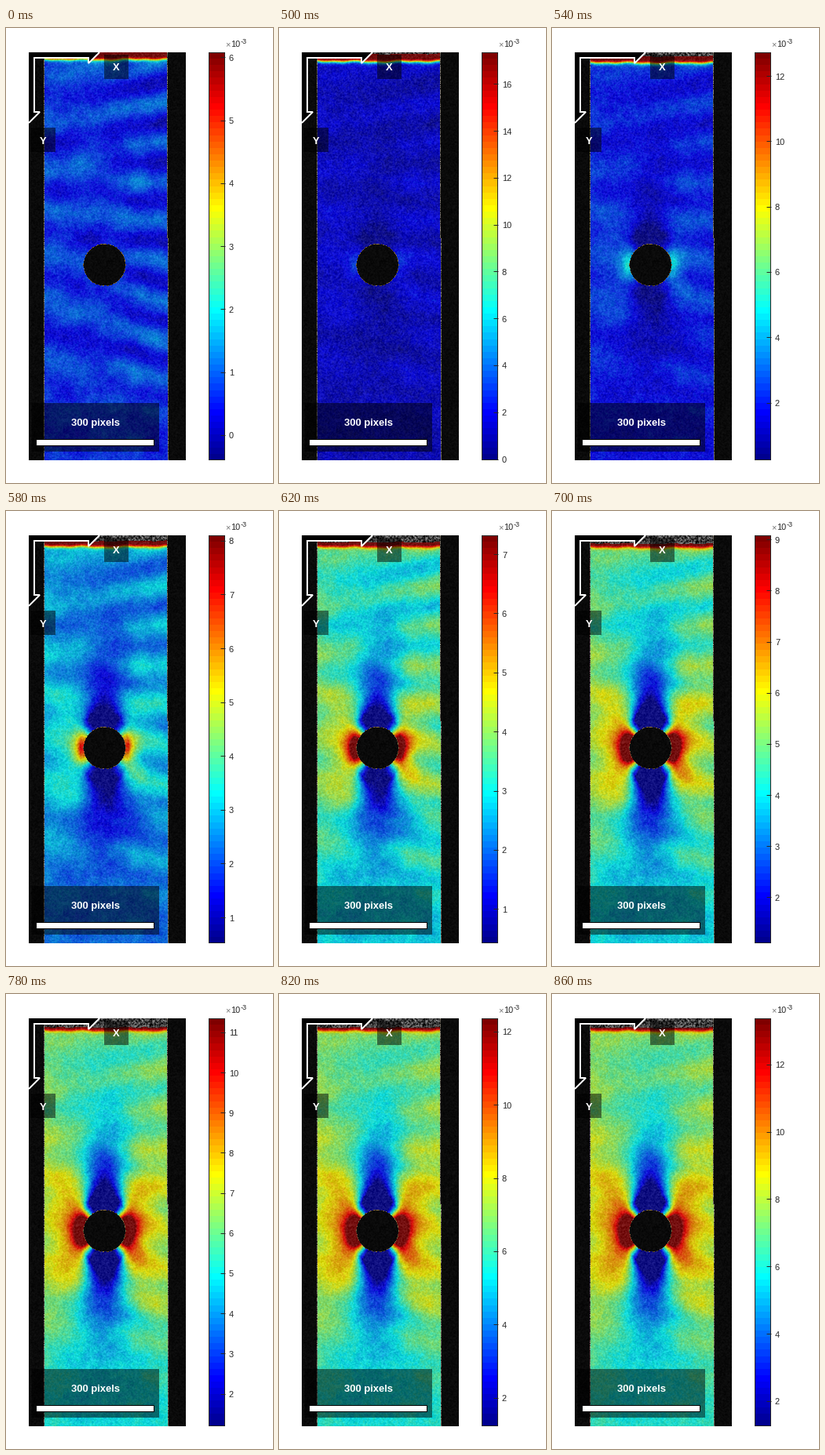
Recreate the animation shown at these times as a matplotlib script. Size 340 by 580 pixels, loop 1400 ms.

```python
import numpy as np
import matplotlib.pyplot as plt
from matplotlib.animation import FuncAnimation
from matplotlib.patches import Polygon, Rectangle

W, H, DPI = 340, 580, 100
STEP_MS, LOOP_MS = 20, 1400
LOAD_START_MS, LOAD_STEP_MS, LOAD_STEPS = 500, 40, 10
X0, X1, Y0, Y1 = 29, 229, 31, 551
HOLE_X, HOLE_Y, HOLE_R = 125.5, 302, 27
INK = "#262626"

# Limits of the colour scale at some load steps, in 1e-3 strain.
KEY_STEPS = (0, 1, 3, 4, 6, 8, 10)
LOW = (-0.40, -0.05, 0.52, 0.42, 1.10, 1.19, 1.25)
HIGH = (6.08, 17.35, 8.10, 7.32, 9.08, 11.35, 13.37)

plt.rcParams["path.snap"] = False
rng = np.random.default_rng(4)
yy, xx = np.mgrid[Y0:Y1, X0:X1] + 0.5
dx, dy = xx - HOLE_X, yy - HOLE_Y
radius = np.hypot(dx, dy)


def soft_noise(size, passes=1):
    """Zero-mean noise with unit deviation and grains of about `size` pixels."""
    n = rng.random(xx.shape)
    for _ in range(passes):
        for axis in (0, 1):
            n = sum(np.roll(n, k, axis) for k in range(size))
    return (n - n.mean()) / n.std()


def sigmoid(t):
    return 1 / (1 + np.exp(-t))


def jet(v):
    t = (np.clip(np.floor(np.asarray(v) * 64), 0, 63) + 1) / 64
    return np.stack([np.clip(1.5 - abs(4 * t - c), 0, 1) for c in (3, 2, 1)], -1)


def hole_pattern(reach=31, stretch=1.5):
    """Axial stress around a hole in a pulled plate (Kirsch), drawn out along y."""
    rho = np.minimum(reach / np.hypot(dx, dy / stretch), 1)
    angle = np.arctan2(dy / stretch, dx)
    c2, c4 = np.cos(2 * angle), np.cos(4 * angle)
    return 1 + rho**2 * (1.5 * c2 - c4) + 1.5 * rho**4 * c4


def measuring_error():
    """Fanned stripes, tighter on the right, over broad random patches."""
    fan = yy - 0.3 * np.clip((yy - 200) / 150, -1, 1) * (xx - 185)
    right = sigmoid((xx - 145) / 12)
    stripes = (0.5 * right * np.cos(2 * np.pi * (fan - 97) / 49.5)
               + 0.3 * (1 - right) * np.cos(2 * np.pi * (fan - 97) / 73))
    return stripes * sigmoid((470 - yy) / 20) + 0.1 * soft_noise(22, 2)


PATTERN = hole_pattern() * (1 - 0.17 * sigmoid((yy - 420) / 35))
ERROR = measuring_error()
SHEAR = np.exp(-((xx - 168) / 42)**2 - ((yy - 388 - 0.4 * (xx - 165)) / 15)**2)
WAVE = (0.8 * np.sin(xx / 9) + 0.6 * np.sin(xx / 4.3 + 1)
        + 0.5 * np.sin(xx / 23 + 2))
SPECKLE = np.clip(0.27 + 0.13 * soft_noise(2), 0, 1)
GRAIN = 0.009 * soft_noise(2, 2) + 0.008 * soft_noise(6, 2)
DARK = np.clip(0.04 + 0.01 * soft_noise(2), 0, 1)
SPARK = rng.random(xx.shape)


def limits(step):
    return np.interp(step, KEY_STEPS, LOW), np.interp(step, KEY_STEPS, HIGH)


def render(step):
    low, high = limits(step)
    shear = 1.2 * np.sin(np.pi * min(step / 8, 1))
    strain = 0.65 + 0.69 * step * PATTERN + ERROR - shear * SHEAR
    v = (strain - low) / (high - low) + GRAIN

    # The hot rim slides down and uncovers bare specimen above it.
    rim = 46.8 - 6.8 * np.exp(-step / 2)
    top = 43.5 - 14.5 * np.exp(-step / 3)
    v += (1.08 - v) * sigmoid((rim + 0.7 * WAVE - yy) / 1.5)
    gray = np.repeat(SPECKLE[..., None], 3, -1)
    rgb = 0.79 * jet(v) + 0.21 * gray
    bare = yy < top + 0.5 * WAVE
    rgb[bare] = gray[bare]

    right = np.where(yy < 268, 205, 206)
    outside = (xx < 48) | (xx > right) | (radius < HOLE_R - 0.5)
    rgb[outside] = DARK[outside, None]
    edge = (abs(xx - 48.5) < 0.5) | (abs(xx - right - 0.5) < 0.5)
    rgb[edge] = (0.12 + 0.5 * SPARK[edge, None]) * np.array([1, .95, .85])
    ring = (abs(radius - HOLE_R + 0.3) < 0.4) & (SPARK > 0.4)
    rgb[ring] = 0.6 * SPARK[ring, None] * np.array([1, .8, .5])
    return np.clip(rgb, 0, 1)


IMAGES = [render(k) for k in range(LOAD_STEPS + 1)]

fig = plt.figure(figsize=(W / DPI, H / DPI), dpi=DPI, facecolor="white")
ax = fig.add_axes([0, 0, 1, 1])


def px(size):
    return size * 72 / DPI


def label(x, y, text, size=11, color=INK, **kw):
    return ax.text(x, y, text, fontsize=px(size), color=color,
                   family="Liberation Sans", va="center_baseline", **kw)


def box(x0, y0, x1, y1, **kw):
    ax.add_patch(Rectangle((x0, y0), x1 - x0, y1 - y0, **kw))


picture = ax.imshow(IMAGES[0], extent=(X0, X1, Y1, Y0),
                    interpolation="nearest", zorder=0)
bar = jet((np.arange(64)[::-1, None] + 0.5) / 64)
ax.imshow(bar, extent=(258, 279, Y1, Y0), interpolation="nearest", zorder=0)
box(258.5, 31.5, 278.5, 550.5, fill=False, ec=INK, lw=px(1))

# Axis arrows: black corner with a white outline
outline = [(119, 31), (105, 45), (105, 38), (36, 38),
           (36, 107), (43, 107), (29, 121)]
ax.add_patch(Polygon([(X0, Y0)] + outline, fc="black", ec="none"))
ax.plot(*zip(*outline), color="white", lw=px(2),
        solid_joinstyle="miter", solid_capstyle="butt")

for corners in ((125, 34, 156, 65), (31, 127, 63, 158), (33, 478, 195, 540)):
    box(*corners, fc="black", alpha=0.5, lw=0)
for x, y, text in ((140.5, 50, "X"), (47, 143.5, "Y"), (114.2, 503, "300 pixels")):
    label(x, y, text, 13, "white", weight="bold", ha="center")
box(38.5, 524.5, 188.5, 532.5, fc="white", ec="black", lw=px(1))

label(279.5, 20.5, "×", color="#777777")
label(286.5, 20.5, "10")
label(298.5, 16, "-3", 9)

ticks = [(ax.plot([], [], color=INK, lw=px(1))[0], label(284, 0, ""))
         for _ in range(12)]

ax.set_aspect("auto")
ax.set_xlim(0, W)
ax.set_ylim(H, 0)
ax.axis("off")


def update(frame):
    elapsed = frame * STEP_MS - LOAD_START_MS
    step = int(np.clip(elapsed // LOAD_STEP_MS + 1, 0, LOAD_STEPS))
    picture.set_data(IMAGES[step])
    low, high = limits(step)
    stride = 1 if high - low < 10.5 else 2
    first = int(np.ceil(low / stride)) * stride
    for i, (mark, text) in enumerate(ticks):
        value = first + i * stride
        y = Y1 - (value - low) / (high - low) * (Y1 - Y0)
        mark.set_data([274, 279], [round(y) + 0.5] * 2)
        text.set_position((284, y + 0.5))
        text.set_text(str(value))
        for part in (mark, text):
            part.set_visible(value <= high)
    return [picture]


anim = FuncAnimation(fig, update, frames=LOOP_MS // STEP_MS, interval=STEP_MS,
                     repeat=True, repeat_delay=0, blit=False)
plt.show()
```
